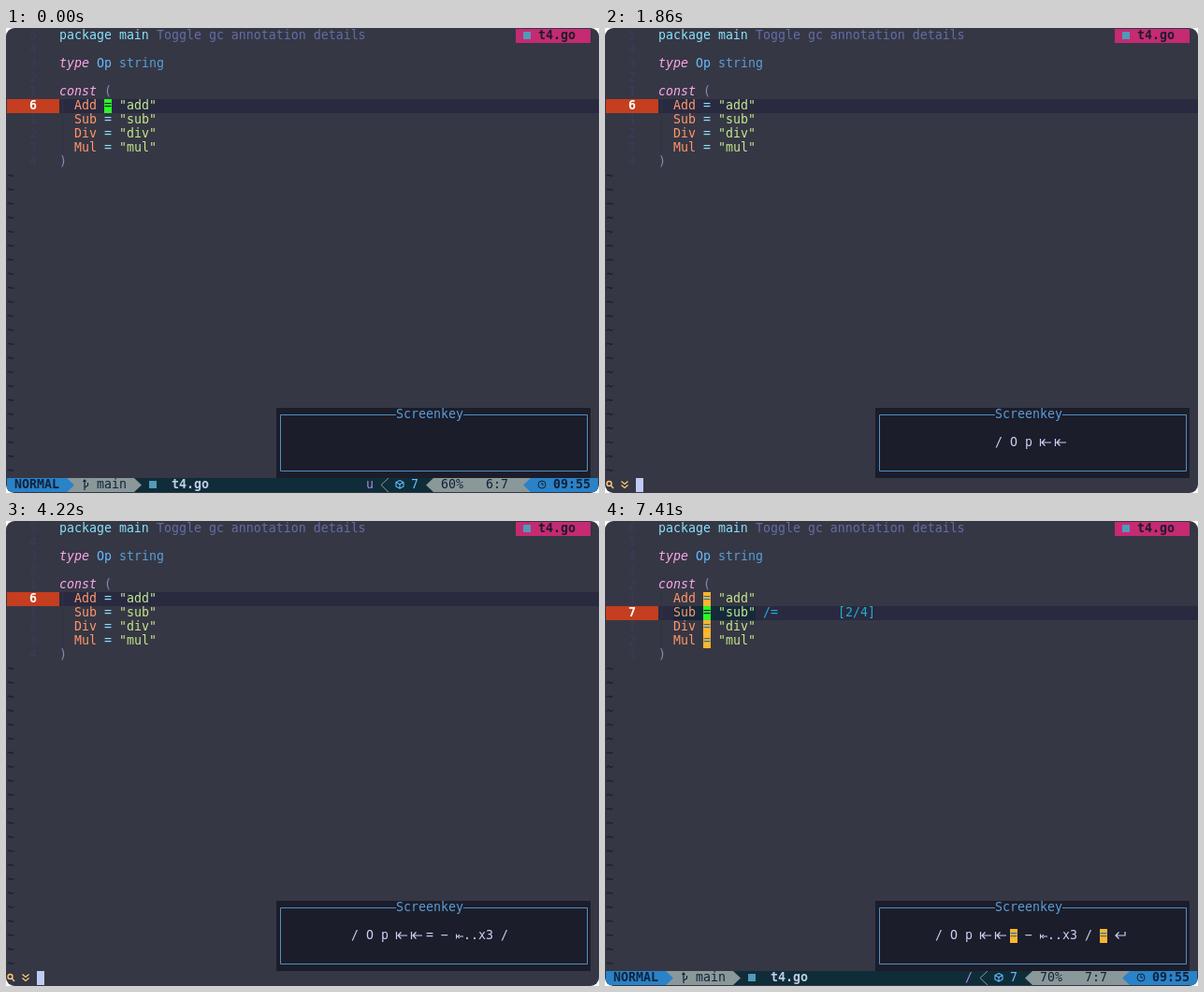
An HTML page with a canvas for the animation above (8000 ms loop, 634 by 497 pixels).

```html
<!DOCTYPE html>
<html lang="en">
<head>
<meta charset="utf-8">
<title>Incremental search</title>
<style>
  html, body { margin: 0; width: 100%; height: 100%; overflow: hidden; background: #fff; }
  canvas { display: block; }
</style>
</head>
<body>
<canvas id="stage" width="634" height="497"></canvas>
<script>
const ctx = document.getElementById('stage').getContext('2d');
const CELL_W = 8, CELL_H = 15, LOOP = 8000, STATUS_ROW = 33;
const FONT = '13.288px "DejaVu Sans Mono", monospace';

const C = {
  bg: '#363744', line: '#292a40', number: '#c43e1f', faint: '#3c3b58', tilde: '#1f2038',
  cyan: '#86e1fc', pink: '#fca7ea', type: '#65bcff', builtin: '#589ed7', paren: '#828bb8',
  constant: '#ff966c', operator: '#89ddff', string: '#c3e88d', comment: '#636da6',
  tag: '#c52a72', icon: '#519aba', cursor: '#2bf82b', dark: '#1b1d2b', text: '#c8d3f5',
  match: '#ffb52e', matchText: '#2f70a5', current: '#ff8f6b',
  panel: '#1c1d2a', border: '#4f8fc0', status: '#0f2d38', blue: '#2a82c8', grey: '#8a9899',
  ink: '#10233a', yellow: '#ffc777', purple: '#a98ae0', lens: '#1fb0d0', near: '#14293a'
};

const entry = name => [
  ['  ' + name + ' ', C.constant], ['= ', C.operator], [`"${name.toLowerCase()}"`, C.string]
];
const code = [
  [['package main', C.cyan], [' Toggle gc annotation details', C.comment]],
  [],
  [['type', C.pink, 'italic'], [' Op', C.type], [' string', C.builtin]],
  [],
  [['const', C.pink, 'italic'], [' (', C.paren]],
  entry('Add'), entry('Sub'), entry('Div'), entry('Mul'),
  [[')', C.paren]]
];

// A string in "cmd" means the search prompt is open; otherwise the editor is in normal mode.
const typed = '/ O p ⇤ ⇤ = −';
const states = [
  { at: 0, row: 6, keys: '', pending: 'u' },
  { at: 560, row: 6, keys: '/', cmd: '' },
  { at: 1080, row: 3, keys: '/ O', cmd: 'O' },
  { at: 1340, row: 3, keys: '/ O p', cmd: 'Op' },
  { at: 1860, row: 6, keys: '/ O p ⇤ ⇤', cmd: '' },
  { at: 2380, row: 6, keys: typed, cmd: '=−' },
  { at: 2900, row: 6, keys: typed + ' ⇤ ⇤', cmd: '' },
  { at: 3160, row: 6, keys: typed + ' ⇤..x3', pending: '/' },
  { at: 4220, row: 6, keys: typed + ' ⇤..x3 /', cmd: '' },
  { at: 5030, row: 7, keys: typed + ' ⇤..x3 / =', cmd: '=' },
  { at: 5560, row: 7, keys: typed + ' ⇤..x3 / = ↵', pending: '/', found: '=' }
];

const colX = col => 1 + col * CELL_W;
const rowY = row => 1 + (row - 1) * CELL_H;

function rect(x, y, w, h, color) {
  ctx.fillStyle = color;
  ctx.fillRect(x, y, w, h);
}

function cells(col, row, count, color) {
  rect(colX(col), rowY(row), count * CELL_W, CELL_H, color);
}

function put(col, row, text, color, style = '') {
  ctx.font = `${style} ${FONT}`;
  ctx.fillStyle = color;
  ctx.fillText(text, colX(col), rowY(row) + 11);
}

function stroke(path, x, y, color, width = 1) {
  ctx.save();
  ctx.translate(x, y);
  ctx.strokeStyle = color;
  ctx.lineWidth = width;
  ctx.stroke(new Path2D(path));
  ctx.restore();
}

// Powerline wedge filling one cell; dir 1 points right, -1 points left.
function wedge(col, dir, color) {
  const x = colX(col), y = rowY(STATUS_ROW);
  const base = dir > 0 ? x : x + CELL_W;
  ctx.fillStyle = color;
  ctx.beginPath();
  ctx.moveTo(base, y);
  ctx.lineTo(base + dir * CELL_W, y + CELL_H / 2);
  ctx.lineTo(base, y + CELL_H);
  ctx.fill();
}

function fileIcon(col, row) {
  rect(colX(col), rowY(row) + 3, 8, 8, C.icon);
}

function drawCode({ row: current, cmd, found }) {
  const search = cmd || found;
  rect(57, rowY(current), 577, CELL_H, C.line);
  cells(0, current, 7, C.number);
  if (found) cells(9, current, 11, C.near);

  code.forEach((parts, i) => {
    const row = i + 1;
    if (row === current) put(3, row, String(row), '#fff', 'bold');
    else put(3, row, String(Math.abs(row - current)), C.faint);
    if (row > 5 && row < 10) rect(60, rowY(row), 1, CELL_H, '#303145');

    let col = 7;
    for (const [text, color, style] of parts) {
      put(col, row, text, color, style);
      col += text.length;
    }
    const line = parts.map(part => part[0]).join('');
    const hit = search ? line.indexOf(search) : -1;
    if (hit >= 0) {
      const active = row === current;
      cells(7 + hit, row, search.length, active ? C.current : C.match);
      put(7 + hit, row, search, active ? C.dark : C.matchText);
    }
  });

  if (cmd === undefined) {
    cells(13, current, 1, C.cursor);
    put(13, current, '=', C.dark);
  }
  if (found) {
    put(21, current, '/=', C.lens);
    put(31, current, '[2/4]', C.lens);
  }
  for (let row = 11; row < STATUS_ROW; row++) put(0, row, '~', C.tilde, 'bold');

  cells(68, 1, 10, C.tag);
  fileIcon(69, 1);
  put(71, 1, 't4.go', C.dark, 'bold');
}

function drawKey(col, key, highlighted) {
  const x = colX(col), y = rowY(30) + 7;
  if (highlighted) {
    cells(col, 30, 1, C.match);
    put(col, 30, key, C.matchText);
  } else if (key === '⇤') {
    stroke('M.5-4V4M12 0H2M5.5-3.5 2 0 5.5 3.5', x, y, C.text, 1.2);
  } else if (key === '↵') {
    stroke('M11-4V0H1M4.5-3.5 1 0 4.5 3.5', x, y, C.text, 1.2);
  } else if (key[0] === '⇤') {
    stroke('M.5-2.5V2.5M8 0H1.5M4-2 1.5 0 4 2', x, y + 1, C.text);
    put(col + 1, 30, key.slice(1), C.text);
  } else {
    put(col, 30, key, C.text);
  }
}

function drawScreenkey({ keys, cmd, found }) {
  cells(36, 28, 42, C.panel);
  rect(289, 406, 336, 75, C.panel);
  stroke('M417 413.5H293.5V473.5H621.5V413.5H489', 0, 0, C.border);
  put(52, 28, 'Screenkey', C.builtin);

  const list = keys ? keys.split(' ') : [];
  const width = list.reduce((sum, key) => sum + key.length + 1, 0);
  let col = 57 - width / 2;
  for (const key of list) {
    drawKey(col, key, key === (cmd || found));
    col += key.length + 1;
  }
}

function drawPrompt(cmd) {
  const y = rowY(STATUS_ROW);
  stroke('M6 6A2.5 2.5 0 1 1 1 6A2.5 2.5 0 1 1 6 6M5.3 8 8 11', 1, y, C.yellow, 1.4);
  stroke('M.5 3.5 4 6.5 7.5 3.5M.5 7.5 4 10.5 7.5 7.5', 17, y, C.yellow, 1.3);
  put(4, STATUS_ROW, cmd, C.paren);
  cells(4 + cmd.length, STATUS_ROW, 1, '#c0caf5');
}

function drawStatus({ row, pending }) {
  const y = rowY(STATUS_ROW);
  const label = (col, text, color, style) => put(col, STATUS_ROW, text, color, style);
  cells(0, STATUS_ROW, 79, C.status);

  cells(8, STATUS_ROW, 9, C.grey);
  cells(0, STATUS_ROW, 8, C.blue);
  wedge(8, 1, C.blue);
  wedge(17, 1, C.grey);
  label(1, 'NORMAL', C.ink, 'bold');
  stroke('M3 2V13M3 10 6.5 8V5M1.5 4 3 2 4.5 4', colX(10), y, C.ink, 1.2);
  label(12, 'main', C.ink);
  fileIcon(19, STATUS_ROW);
  label(22, 't4.go', '#c0cde8', 'bold');

  label(48, pending, C.purple);
  stroke('M8 0 0 7.5 8 15', colX(50), y, C.grey);
  stroke('M4 2.5 8 4.5V9L4 11.2 0 9V4.5ZM0 4.5 4 6.7 8 4.5M4 6.7V11', colX(52), y, C.type, 1.1);
  label(54, '7', C.type);

  cells(57, STATUS_ROW, 13, C.grey);
  wedge(56, -1, C.grey);
  label(58, row * 10 + '%', C.ink);
  label(64, row + ':7', C.ink);
  cells(70, STATUS_ROW, 9, C.blue);
  wedge(69, -1, C.blue);
  stroke('M8 7A4 4 0 1 1 0 7A4 4 0 1 1 8 7M4 4.5V7H6', colX(71), y, C.ink);
  label(73, '09:55', C.ink, 'bold');
}

function draw(now) {
  const time = now % LOOP;
  const state = states.findLast(s => s.at <= time);
  ctx.clearRect(0, 0, 634, 497);
  ctx.save();
  ctx.beginPath();
  ctx.roundRect(0, 0, 634, 497, 9);
  ctx.clip();
  rect(0, 0, 634, 497, C.bg);
  drawCode(state);
  drawScreenkey(state);
  if (state.cmd === undefined) drawStatus(state);
  else drawPrompt(state.cmd);
  ctx.restore();
}

const start = performance.now();
function tick() {
  draw(performance.now() - start);
  requestAnimationFrame(tick);
}
tick();
</script>
</body>
</html>
```
